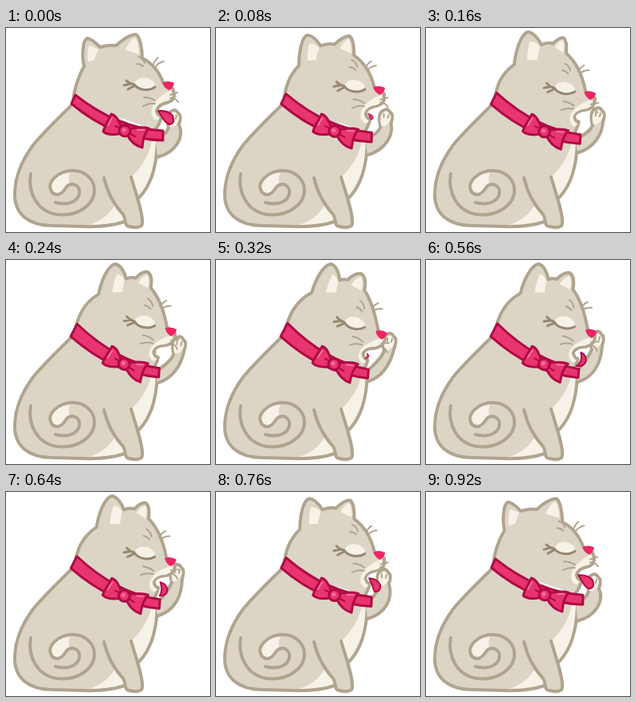
An HTML page that plays this animation: 256x256 px, repeating every 960 ms.

```html
<!DOCTYPE html>
<html lang="en">
<head>
<meta charset="utf-8">
<title>Cat washing its paw</title>
<style>
html, body { margin: 0; width: 100%; height: 100%; overflow: hidden; background: #fff; }
svg { display: block; width: 100vw; height: 100vh; }
.fur { fill: #dcd5c6; }
.line { stroke: #b0a48f; stroke-width: 4; }
.thin { fill: none; stroke: #b0a48f; stroke-width: 2; }
.lash { stroke: #978871; stroke-width: 3; }
.pale { fill: #f6f2e7; }
.pink { fill: #e9356f; stroke: #b00a45; stroke-width: 3; }
.shine { fill: none; stroke: #f3769d; stroke-width: 2; }
</style>
</head>
<body>
<svg viewBox="0 0 256 256" fill="none" stroke-linecap="round" stroke-linejoin="round">
  <!-- body -->
  <path class="fur" d="M84 92C66 113 48 130 34 147C20 166 11 188 11 209C11 234 29 248 58 248L95 249C118 250 136 248 150 242L167 213C184 198 189 170 190 136L140 112Z"/>
  <path class="pale" d="M184 138C180 160 170 175 157 187L167 213C184 198 189 170 190 138Z"/>
  <path class="pale" d="M98 249C118 244 130 234 137 221L150 238L148 244C132 249 115 250 98 249Z"/>
  <path class="line" d="M81 98C66 113 48 130 34 147C20 166 11 188 11 209C11 234 29 248 58 248L95 249C118 250 134 248 149 243"/>
  <path class="line" d="M190 142C189 175 182 197 167 213"/>
  <!-- front leg -->
  <path class="fur" d="M123 188C127 206 136 222 147 234C151 240 148 248 154 249C162 251 171 251 171 245C172 232 163 208 157 187Z"/>
  <path class="line" d="M123 188C127 206 136 222 147 234C151 240 148 248 154 249C162 251 171 251 171 245C172 232 163 208 157 187"/>
  <!-- tail -->
  <path class="pale" d="M56 203C53 193 65 181 82 179C78 185 78 191 80 197C74 199 74 206 68 208C62 210 58 208 56 203Z"/>
  <path class="line" d="M31 183C27 205 38 230 64 234C90 237 111 222 111 203C110 187 96 178 82 179C65 180 52 193 56 203C58 209 64 210 68 208C75 205 74 196 84 196C95 198 95 212 84 218C78 221 70 221 62 219"/>
  <!-- raised paw -->
  <path id="arm" class="fur line"/>
  <path id="paw" class="pale"/>
  <path id="toes" class="thin"/>
  <!-- head -->
  <path id="head" class="fur line"/>
  <path id="muzzle" class="pale"/>
  <path id="earL" class="pale"/>
  <path id="earR" class="pale"/>
  <path id="lip" class="line" style="stroke-width:3"/>
  <g id="eye">
    <path class="pale" d="M161 70C165 60 181 60 187 70C186 78 172 80 161 70Z"/>
    <path class="lash" d="M151 66Q155 70 161 71C167 79 180 79 187 74M156 70L148 72M160 73L153 77"/>
  </g>
  <path id="frown" class="thin" d="M166 36Q172 38 174 44M164 45Q169 45 172 48"/>
  <path id="brow" class="thin" d="M185 46Q187 40 191 37M188 48Q192 43 198 42"/>
  <path id="whiskL" class="thin" d="M173 87Q181 87 187 91M172 98Q179 94 187 95"/>
  <path id="whiskR" class="thin" d="M206 84L215 81M206 88Q212 87 216 93"/>
  <path id="nose" d="M196 69Q203 65 211 69Q210 75 205 78Q199 76 196 69Z" fill="#ee2463"/>
  <path id="tongue" class="pink" style="stroke-width:2"/>
  <!-- collar and bow -->
  <path id="collar" class="pink"/>
  <g id="bow" class="pink">
    <path d="M145 126C143 118 138 109 132 108C130 114 124 122 122 130C128 135 138 134 146 132Z"/>
    <path d="M153 127C160 126 170 123 179 126C173 133 172 140 171 150C163 148 156 142 152 134Z"/>
    <path d="M144 126L137 123M154 132L162 136" style="stroke-width:2"/>
    <path class="shine" d="M133 113Q130 118 128 122M165 128L173 128"/>
    <circle cx="149" cy="129" r="7"/>
    <circle cx="148" cy="128" r="2.5" fill="#f7709b" stroke="none"/>
  </g>
</svg>
<script>
const LOOP = 960, STEP = 40;
const times = [0, 160, 320, 480, 640, 760, 920, 960];
const tracks = {
  nod: [0, .53, .93, 1, .65, .3, .02, 0],
  pawX: [0, 5, 7, 4, 4, 0, 0, 0],
  pawY: [0, -3, -11, -14, -12, -6, 0, 0],
  lick: [1, 0, .4, .95, 1, 1, 1, 1]
};
// evenly spaced poses from head raised to head lowered
const shapes = {
  head: [
    "M84,92C86,75 90,62 98,48C95,36 96,15 102,13C107,13 113,19 118,24C125,22 131,21 138,22C146,15 156,8 163,8C168,10 171,26 171,38C182,43 192,54 197,68L209,76C213,84 211,90 204,93C197,95 191,97 189,104C190,109 192,111 195,111C194,118 191,123 187,128",
    "M86,92C88,74 92,60 110,46C112,28 118,7 127,5C134,6 141,14 144,21C149,18 154,18 159,19C164,14 169,11 172,12C176,16 176,24 175,31C188,42 196,58 200,79L212,87C213,96 208,99 202,101C195,103 188,103 186,110C187,115 189,117 192,117C190,125 187,130 186,133",
    "M85,92C92,70 100,50 122,40C126,26 137,6 147,5C154,7 157,18 157,26C160,25 163,25 166,26C172,20 179,17 184,18C190,22 190,30 188,39C196,52 201,72 204,90L212,97C212,106 207,110 200,112C192,112 187,113 184,119C185,124 187,126 190,127C189,133 187,136 184,138"
  ],
  muzzle: [
    "M207,78C211,85 208,90 202,92C196,93 189,97 187,104C188,109 190,111 193,112C190,118 186,116 183,110C180,98 190,86 207,78Z",
    "M210,99C211,105 206,108 199,110C191,110 185,112 182,119C183,124 185,126 188,128C185,133 181,130 179,124C177,112 190,104 210,99Z"
  ],
  lip: [
    "M210,80C213,88 209,92 203,93C196,94 189,98 189,104",
    "M212,99C212,106 207,110 200,112C192,112 185,114 184,119"
  ],
  earL: [
    "M104,22C109,23 113,25 116,27C114,31 112,35 111,40L103,42C102,35 103,28 104,22Z",
    "M129,17C136,17 141,20 142,23C141,30 139,35 139,40L126,40C126,32 127,24 129,17Z",
    "M149,18C153,20 154,24 155,28C154,33 153,37 153,41L140,41C142,32 145,24 149,18Z"
  ],
  earR: [
    "M150,28C152,21 157,14 162,12C166,18 167,26 167,33C161,31 156,29 150,28Z",
    "M161,24C163,19 167,16 171,15C173,20 173,25 172,31C168,28 164,26 161,24Z",
    "M171,33C174,27 179,23 184,22C186,28 186,34 184,40C180,37 175,35 171,33Z"
  ],
  collar: [
    "M87,84Q140,126 197,129L197,141Q136,140 82,95Z",
    "M90,79Q138,128 191,138L190,149Q132,142 81,96Z"
  ],
  tongue: [
    "M0,0Q12,-1 18,6Q22,16 14,17Q8,14 5,8Z",
    "M9,0Q16,4 13,13Q8,19 0,17Q7,14 9,6Z"
  ]
};
// pivot x, y, shift x, y and turn when lowered
const parts = {
  eye: [170, 71, 0, 9, 8],
  frown: [169, 42, 14, 17, 17],
  brow: [190, 42, 12, 18, 20],
  whiskL: [180, 92, -3, 11, 12],
  whiskR: [206, 86, 1, 22, 17],
  nose: [203, 72, 4, 23, 10],
  bow: [149, 129, -1, 2, 6]
};
const el = id => document.getElementById(id);
const lerp = (a, b, k) => a + (b - a) * k;

function slope(v, i) {
  const n = v.length - 1;
  if (i === 0 || i === n) {
    return (v[1] - v[n - 1]) / (times[1] + LOOP - times[n - 1]);
  }
  return (v[i + 1] - v[i - 1]) / (times[i + 1] - times[i - 1]);
}

function sample(v, t) {
  let i = 0;
  while (t >= times[i + 1]) i++;
  const h = times[i + 1] - times[i], u = (t - times[i]) / h, w = 1 - u;
  return v[i] * w * w * (1 + 2 * u) + v[i + 1] * u * u * (3 - 2 * u) +
    h * u * w * (slope(v, i) * w - slope(v, i + 1) * u);
}

function morph(poses, k) {
  const last = poses.length - 1;
  const at = Math.min(last - 1, Math.max(0, Math.floor(k * last)));
  const num = /-?\d+/g, ends = poses[at + 1].match(num);
  let i = 0;
  return poses[at].replace(num, n => lerp(+n, +ends[i++], k * last - at).toFixed(2));
}

function drawPaw(x, y, k) {
  const p = (dx, dy) => `${x + dx},${y + dy} `;
  const top = `C${p(-9, 14)}${p(-10, 3)}${p(-4, 1)}C${p(0, -3)}${p(4, 0)}${p(5, 3)}C${p(9, 5)}${p(8, 11)}${p(6, 17)}`;
  const base = lerp(162, 152, k);
  const side = `${lerp(224, 219, k)},${lerp(136, 128, k)} ${lerp(214, 210, k)},${base - 6}`;
  el("arm").setAttribute("d", `M188,140C194,136 ${p(-10, 30)}${p(-7, 21)}${top}C${side} 190,${base}`);
  el("paw").setAttribute("d", `M${p(-6, 20)}C${p(-8, 13)}${p(-8, 5)}${p(-3, 3)}C${p(0, 0)}${p(3, 2)}${p(4, 5)}C${p(7, 7)}${p(6, 12)}${p(4, 15)}Q${p(0, 21)}${p(-6, 20)}Z`);
  el("toes").setAttribute("d", `M${p(-3, 5)}L${p(-3, 9)}M${p(3, 6)}L${p(2, 10)}`);
}

function draw(t) {
  const now = {};
  for (const id in tracks) now[id] = sample(tracks[id], t);
  const k = now.nod;
  for (const id in shapes) el(id).setAttribute("d", morph(shapes[id], k));
  for (const id in parts) {
    const [x, y, dx, dy, turn] = parts[id];
    el(id).setAttribute("transform", `translate(${dx * k} ${dy * k}) rotate(${turn * k} ${x} ${y})`);
  }
  drawPaw(211 + now.pawX, 104 + now.pawY, k);
  const size = Math.min(1, Math.max(0, now.lick));
  el("tongue").style.display = size > .05 ? "" : "none";
  el("tongue").setAttribute("transform",
    `translate(${lerp(191, 186, k)} ${lerp(104, 118, k)}) scale(${size})`);
}

function tick() {
  const t = performance.now() % LOOP;
  draw(Math.floor(t / STEP) * STEP);
  requestAnimationFrame(tick);
}
tick();
</script>
</body>
</html>
```
